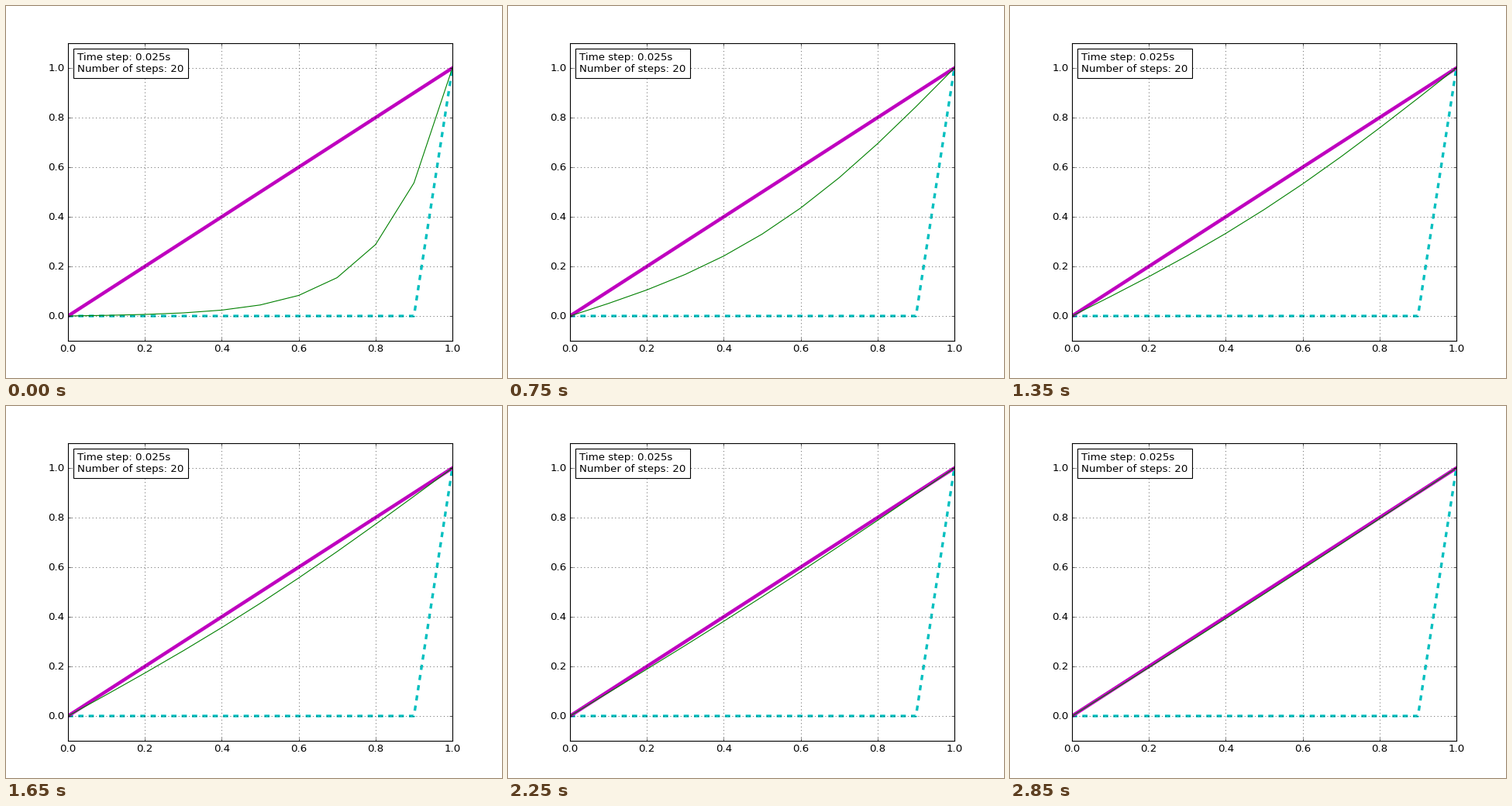
These frames come from a looping animation (640 px wide and 480 px high, 3000 ms). A matplotlib script:

```python
import numpy as np
import matplotlib.pyplot as plt
from matplotlib.animation import FuncAnimation
from matplotlib.offsetbox import AnchoredText

plt.style.use("classic")
plt.rcParams.update({
    "font.family": "DejaVu Sans",
    "figure.facecolor": "white",
    "savefig.dpi": "figure",
})

STEPS = 20
DT = 0.025
DX = 0.1
N = 11

x = np.linspace(0, 1, N)
start = np.zeros(N)
start[-1] = 1

# Implicit Euler for the heat equation, with both end values held fixed
r = DT / DX**2
system = np.eye(N)
for i in range(1, N - 1):
    system[i, i - 1:i + 2] = -r, 1 + 2 * r, -r

states = []
u = start
for _ in range(STEPS):
    u = np.linalg.solve(system, u)
    states.append(u)

fig, ax = plt.subplots(figsize=(8, 6), dpi=80)
ax.set_xlim(0, 1)
ax.set_ylim(-0.1, 1.1)
ax.set_xticks(np.arange(6) / 5)
ax.set_yticks(np.arange(6) / 5)
ax.grid(True)

ax.plot(x, start, "c--", lw=3)
ax.plot(x, x, "m", lw=4)
curve, = ax.plot(x, states[0], "g", lw=1)

note = f"Time step: {DT}s\nNumber of steps: {STEPS}"
ax.add_artist(AnchoredText(note, loc="upper left", pad=0.4, borderpad=0.5,
                           prop={"size": 12}))


def update(frame):
    curve.set_ydata(states[frame])
    return curve,


anim = FuncAnimation(fig, update, frames=STEPS, interval=150,
                     repeat=True, repeat_delay=0)
plt.show()
```
